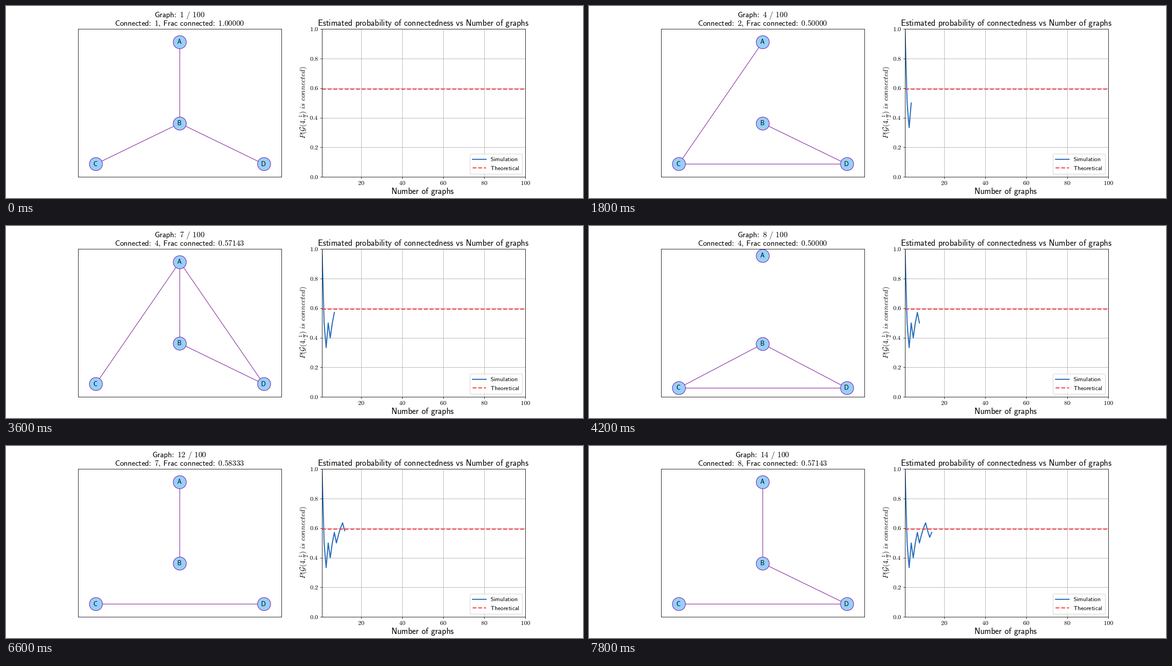
A matplotlib script for the animation above (8 s loop, 1280 by 427 pixels).

```python
import matplotlib.pyplot as plt
import numpy as np
from matplotlib.animation import FuncAnimation
from matplotlib.collections import LineCollection
from matplotlib.patches import FancyBboxPatch

WIDTH, HEIGHT, DPI = 1280, 427, 64
PT = 72 / DPI  # points per pixel
INTERVAL, FRAMES, FRAMES_PER_GRAPH = 200, 40, 3
TOTAL, THEORY = 100, 19 / 32

NODE, PURPLE = "xkcd:light blue", "xkcd:purple"
BLUE, RED, GRID = "xkcd:medium blue", "xkcd:light red", "#b0b0b0"

POS = {"A": (0, 2), "B": (0, 0), "C": (-1, -1), "D": (1, -1)}
GRAPHS = [g.split() for g in (
    "AB BC BD", "AB BD", "BC AD", "AC BD CD", "BC BD CD",
    "AC BC BD CD", "AB AC AD BD", "BC BD CD", "AB AC AD BC BD",
    "AB AC BC BD CD", "AB AD BC CD", "AB CD", "AB BD", "AB BD CD")]

plt.rcParams.update({
    "mathtext.fontset": "cm",
    "axes.linewidth": 0.95 * PT,
    "xtick.major.width": 0.95 * PT, "ytick.major.width": 0.95 * PT,
    "xtick.major.size": 4.15 * PT, "ytick.major.size": 4.15 * PT,
})


def is_connected(edges):
    reached = {"A"}
    for _ in POS:
        for edge in edges:
            if reached & set(edge):
                reached |= set(edge)
    return len(reached) == len(POS)


def limits(edges, axis):
    """View range: node extent, widened by padding around the edges, plus a margin."""
    values = [p[axis] for p in POS.values()]
    touched = [POS[node][axis] for edge in edges for node in edge]
    pad = 0.05 * (max(touched) - min(touched))
    low = min(min(values), min(touched) - pad)
    high = max(max(values), max(touched) + pad)
    margin = 0.05 * (high - low)
    return low - margin, high + margin


def sans(text):
    """Upright sans math text with ordinary word spacing."""
    text = text.replace(": ", r"\hspace{-0.2}:\hspace{0.31}")
    text = text.replace(", ", r",\hspace{0.18}")
    return r"$\mathsf{" + text.replace(" ", r"\hspace{0.38}") + "}$"


def label(x, y, text, size, ha="center", va="baseline", **kwargs):
    return stage.text(x, y, text, fontsize=size * PT, ha=ha, va=va, **kwargs)


counts = np.cumsum([is_connected(g) for g in GRAPHS])
numbers = np.arange(1, len(GRAPHS) + 1)
fractions = counts / numbers

fig = plt.figure(figsize=(WIDTH / DPI, HEIGHT / DPI), dpi=DPI, facecolor="white")
panel = 0.775 / 2.2
graph_ax = fig.add_axes([0.125, 0.11, panel, 0.77])
plot_ax = fig.add_axes([0.9 - panel, 0.11, panel, 0.77])
stage = fig.add_axes([0, 0, 1, 1], zorder=5)
stage.set(xlim=(0, WIDTH), ylim=(HEIGHT, 0))
stage.axis("off")

# Graph panel
graph_ax.set(xticks=[], yticks=[])
edge_lines = LineCollection([], colors=PURPLE, linewidths=1.185 * PT, zorder=1)
graph_ax.add_collection(edge_lines, autolim=False)
graph_ax.scatter(*zip(*POS.values()), s=(29 * PT) ** 2, c=NODE,
                 edgecolors=PURPLE, linewidths=1.185 * PT, zorder=2)
for name, point in POS.items():
    graph_ax.annotate(sans(name), point, xytext=(-1.3 * PT, -4.1 * PT),
                      textcoords="offset points", ha="center", va="baseline",
                      fontsize=14.2 * PT, zorder=3)
count_title = label(384.8, 25, "", 17.3)
fraction_title = label(384.8, 44, "", 17.3)

# Probability panel
x_ticks, y_ticks = np.arange(20, 101, 20), np.linspace(0, 1, 6)
plot_ax.set(xlim=(1, TOTAL), ylim=(0, 1), xticks=x_ticks, yticks=y_ticks)
plot_ax.tick_params(labelbottom=False, labelleft=False)
plot_ax.grid(color=GRID, linewidth=0.95 * PT)
simulation, = plot_ax.plot([], [], color=BLUE, lw=2.37 * PT)
plot_ax.plot([1, TOTAL], [THEORY] * 2, "--", color=RED, lw=2.37 * PT)

for value in x_ticks:
    x = 701.1 + (value - 1) / (TOTAL - 1) * 450.9
    label(x, 398.4, rf"$\mathrm{{{value}}}$", 14)
for value in y_ticks:
    label(693, 384.6 - 328.8 * value, rf"$\mathrm{{{value:.1f}}}$", 14, ha="right")

label(925.8, 44, sans("Estimated probability of connectedness vs Number of graphs"), 18.45)
label(924.6, 418.4, sans("Number of graphs"), 18.45)
label(661.5, 215, r"$P(\mathcal{G}(4,\frac{1}{2})\ is\ connected)$", 16.1,
      va="center", rotation=90)

# Legend
stage.add_patch(FancyBboxPatch((1029.5, 329.3), 116, 44.6,
                               boxstyle="round,pad=0,rounding_size=2.6",
                               facecolor="white", edgecolor="0.8",
                               linewidth=1.185 * PT, alpha=0.8))
for y, style, color, text in ((340.5, "-", BLUE, "Simulation"),
                              (360, "--", RED, "Theoretical")):
    stage.plot([1034.5, 1064.8], [y, y], style, color=color, lw=2.37 * PT)
    label(1074.3, y + 4.7, sans(text), 13.7, ha="left")


def update(frame):
    index = frame // FRAMES_PER_GRAPH
    edges = GRAPHS[index]
    edge_lines.set_segments([[POS[a], POS[b]] for a, b in edges])
    graph_ax.set(xlim=limits(edges, 0), ylim=limits(edges, 1))
    count_title.set_text(sans(f"Graph: {index + 1} / {TOTAL}"))
    fraction_title.set_text(sans(
        f"Connected: {counts[index]}, Frac connected: {fractions[index]:.5f}"))
    simulation.set_data(numbers[:index + 1], fractions[:index + 1])
    return edge_lines, count_title, fraction_title, simulation


animation = FuncAnimation(fig, update, frames=FRAMES, interval=INTERVAL,
                          repeat=True, repeat_delay=0, blit=False)
plt.show()
```
